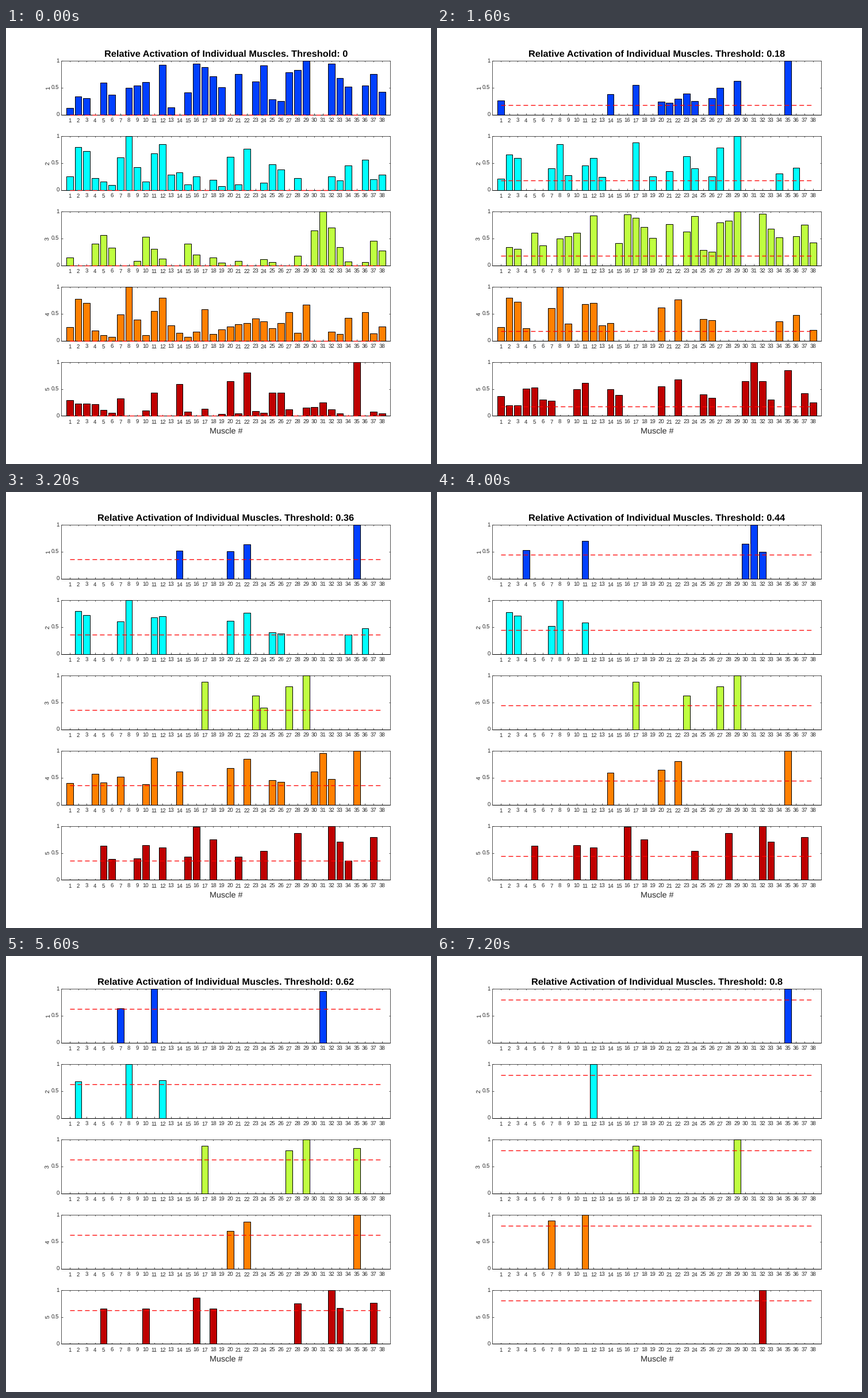
Animation, 739 px wide and 758 px high, one loop 8000 ms. Source, as a matplotlib script:

```python
import numpy as np
import matplotlib.pyplot as plt
from matplotlib.animation import FuncAnimation
from matplotlib.patches import Rectangle

W, H, DPI = 739, 758, 100
PT = 72 / DPI
N = 38
LEFT, RIGHT = 96.2, 668.4
TOP, ROW_H, PITCH = 56.9, 93.8, 130.95
STEP = (RIGHT - LEFT) / (N + 1)
BAR_W = 0.8 * STEP
TICK = 2.5
INK = "#262626"
COLORS = ["#0040ff", "#00ffff", "#bfff40", "#ff8000", "#bf0000"]
MAX_CUT = 0.8

plt.rcParams["font.family"] = "Liberation Sans"
plt.rcParams["text.hinting"] = "none"


def group(peaks):
    """Activation vector of one muscle group from its peaks."""
    out = np.zeros(N)
    for muscle, level in peaks.items():
        out[muscle - 1] = level
    return out


# Muscle groups; every chart row is a weighted sum of them
quad = group({2: .68, 3: .61, 8: 1})
shin = group({1: .25, 9: .32, 12: .7, 13: .28, 34: .36, 36: .48, 38: .2})
hip = group({2: .15, 3: .15, 4: .3, 7: .8, 11: .9})
ham = group({14: .36, 20: .68, 22: .85, 25: .45, 26: .42})
psoas = group({1: .26, 2: .17, 3: .17, 14: .25, 35: 1})
back = group({1: .15, 4: .4, 5: .43, 6: .25, 10: .4, 11: .3, 15: .32,
              30: .65, 31: 1, 32: .5, 33: .2, 37: .3, 38: .2})
side = group({5: .63, 6: .39, 9: .4, 10: .64, 12: .6, 15: .43, 16: .99,
              18: .75, 19: .27, 21: .43, 24: .54, 25: .3, 28: .87, 32: 1,
              33: .71, 34: .36, 36: .32, 37: .79, 38: .34})
trunk = group({17: .88, 19: .25, 21: .35, 23: .62, 24: .4, 26: .25,
               27: .79, 29: 1})

# Combinations that recur
knee = quad + shin
front = knee + .75 * hip + .9 * ham
wide = .5 * knee + .95 * side + trunk
core = psoas + .95 * ham
spine = .95 * back + .65 * hip + ham + psoas

STATES = [
    (wide, front + .25 * side, back + .2 * side,
     .9 * knee + .55 * hip + .35 * ham + .6 * trunk + .15 * side,
     core + .4 * hip + .25 * back + .15 * trunk),
    (trunk + .75 * psoas, front, wide, psoas + 1.1 * ham + .35 * side,
     back + .4 * side + .5 * ham + .45 * hip + .28 * psoas),
    (psoas + .63 * trunk + .35 * ham, .85 * knee + .5 * hip + trunk, wide,
     front, back + .85 * psoas + .8 * ham + .35 * hip + .15 * side),
    (psoas + .75 * ham, front, trunk, spine, side),
    (psoas + .75 * ham, front, trunk, spine, side),
    (back + .45 * hip, quad + .65 * hip, trunk, core, side),
    (back + .7 * hip, knee, trunk, core, side + .1 * back),
    (hip + 1.2 * back, knee, trunk + .84 * psoas, psoas + 1.02 * ham,
     side + .3 * back),
    (hip + 1.1 * back, knee + .2 * shin, trunk, psoas + 1.02 * ham,
     side + .45 * back),
    (psoas, shin, trunk, hip, side + back),
]

fig = plt.figure(figsize=(W / DPI, H / DPI), dpi=DPI, facecolor="white")
ax = fig.add_axes([0, 0, 1, 1])
ax.set(xlim=(0, W), ylim=(H, 0))
ax.axis("off")


def label(x, y, text, px, **kw):
    kw = {"ha": "center", "va": "baseline", "color": INK, **kw}
    return ax.text(x, y, text, fontsize=px * PT, **kw)


def stroke(xs, ys, **kw):
    kw = {"color": INK, "lw": .8 * PT, "zorder": 1,
          "solid_capstyle": "butt", **kw}
    return ax.plot(xs, ys, **kw)[0]


def build_row(r):
    top = TOP + r * PITCH
    base = top + ROW_H
    bars = []
    for k in range(1, N + 1):
        x = LEFT + k * STEP
        stroke([x, x], [base, base - TICK])
        stroke([x, x], [top, top + TICK])
        label(x, base + 13.6, str(k), 9.7)
        bars.append(ax.add_patch(Rectangle(
            (x - BAR_W / 2, base), BAR_W, 0,
            fc=COLORS[r], ec="black", lw=PT, zorder=3)))
    for v in (0, .5, 1):
        y = base - v * ROW_H
        stroke([LEFT, LEFT + TICK], [y, y])
        stroke([RIGHT, RIGHT - TICK], [y, y])
        label(92.5, y + 3.6, f"{v:g}", 9.7, ha="right")
    label(73.2, top + ROW_H / 2, str(r + 1), 10.4, rotation=90, va="center")
    ax.add_patch(Rectangle((LEFT, top), RIGHT - LEFT, ROW_H, fill=False,
                           ec=INK, lw=.8 * PT, zorder=2))
    stroke([LEFT, RIGHT], [base, base], color="black", lw=PT, zorder=2)
    line = stroke([LEFT + STEP, LEFT + N * STEP], [base, base], color="red",
                  lw=1.33 * PT, zorder=4, dashes=(6, 3.75),
                  dash_capstyle="butt")
    return base, bars, line


rows = [build_row(r) for r in range(len(COLORS))]
title = label(382.5, 50, "", 16.4, weight="bold", color="black")
label(382.5, 705, "Muscle #", 14.4)


def update(i):
    cut = MAX_CUT * i / (len(STATES) - 1)
    title.set_text("Relative Activation of Individual Muscles. "
                   f"Threshold: {round(cut, 2):g}")
    for (base, bars, line), mix in zip(rows, STATES[i]):
        levels = mix / mix.max()
        for bar, v in zip(bars, levels):
            bar.set_height(-v * ROW_H)
            bar.set_visible(v > 0 and v >= cut)
        y = base - cut * ROW_H
        line.set_ydata([y, y])
    return []


anim = FuncAnimation(fig, update, frames=len(STATES), interval=800,
                     init_func=lambda: update(0), repeat=True, blit=False)
plt.show()
```
